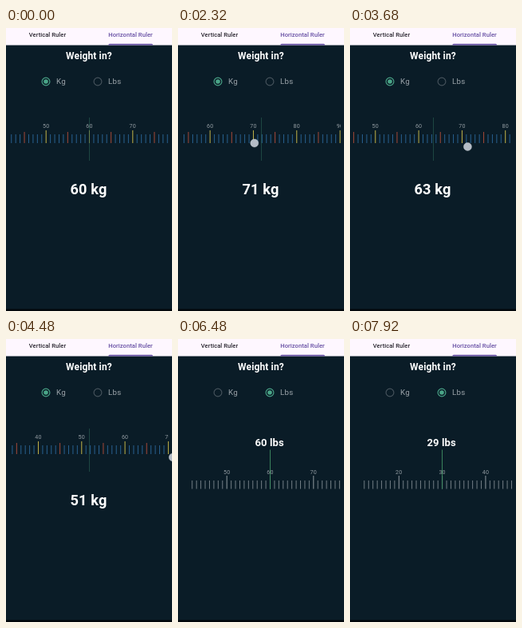
Write an HTML page that moves like this. It is 208 px wide and 354 px high and loops after 8 s.

```html
<!DOCTYPE html>
<html lang="en">
<head>
<meta charset="utf-8">
<title>Ruler picker</title>
<style>
  html, body { margin: 0; width: 100%; height: 100%; overflow: hidden; background: #0a1c27; }
  svg { display: block; width: 208px; height: 354px; font-family: Roboto, sans-serif; }
  text { text-anchor: middle; }
  .tab { font-size: 7.58px; font-weight: 500; letter-spacing: .05px; fill: #29262f; }
  .tab.on { fill: #6750a4; }
  .title { font-size: 12px; font-weight: 700; letter-spacing: .13px; fill: #fff; }
  .option { font-size: 9.75px; letter-spacing: .25px; fill: #9aa3a9; text-anchor: start; }
  .value { font-weight: 700; letter-spacing: .13px; fill: #fff; }
  .num { font-size: 7.1px; letter-spacing: .2px; fill: #929ba1; }
  .ring { fill: none; stroke-width: 1.15; }
</style>
</head>
<body>
<svg viewBox="0 0 208 354">
  <defs>
    <clipPath id="kgClip"><rect x="4" y="100" width="200" height="80"/></clipPath>
    <clipPath id="lbsClip"><rect x="15.5" y="150" width="188.5" height="50"/></clipPath>
  </defs>
  <rect width="208" height="354" fill="#0a1c27"/>
  <rect y="351.5" width="208" height="2.5" fill="#02070b"/>
  <rect width="208" height="21.5" fill="#fef7ff"/>
  <text class="tab" x="52" y="10.8">Vertical Ruler</text>
  <text class="tab on" x="156" y="10.8">Horizontal Ruler</text>
  <path d="M128.3 21.5v-.2q0-1.6 1.6-1.6h52.6q1.6 0 1.6 1.6v.2z" fill="#6750a4"/>
  <text class="title" x="104" y="39">Weight in?</text>

  <g id="kgRadio" transform="translate(50 67)"><circle class="ring" r="4.9"/><circle class="dot" fill="#4aa588"/></g>
  <text class="option" x="63" y="70.4">Kg</text>
  <g id="lbsRadio" transform="translate(115 67)"><circle class="ring" r="4.9"/><circle class="dot" fill="#4aa588"/></g>
  <text class="option" x="128" y="70.4">Lbs</text>

  <g id="kg">
    <g clip-path="url(#kgClip)"><g id="kgScale"></g></g>
    <path d="M104.5 112V166" stroke="#2a6356" stroke-width=".6"/>
    <text id="kgValue" class="value" x="103.5" y="207.6" font-size="18.2"></text>
  </g>
  <g id="lbs">
    <g clip-path="url(#lbsClip)"><g id="lbsScale"></g></g>
    <path d="M115.5 138.5V187.5" stroke="#3f8f62" stroke-width=".9"/>
    <text id="lbsValue" class="value" x="114.6" y="133.8" font-size="13"></text>
  </g>
  <circle id="touch" r="5" fill="#b4bcc6" stroke="#d3d8de" stroke-width=".4"/>
</svg>
<script>
const LOOP = 8000, UNIT = 5.43, SWITCH = 5200;
const $ = id => document.getElementById(id);
const clamp = (x, a = 0, b = 1) => Math.min(b, Math.max(a, x));

function add(parent, tag, attrs, text = '') {
  const el = document.createElementNS('http://www.w3.org/2000/svg', tag);
  for (const k in attrs) el.setAttribute(k, attrs[k]);
  el.textContent = text;
  parent.append(el);
}

// kinds: [ones, fives, tens], each with a top edge and a colour
function buildScale(scale, from, to, bottom, labelY, kinds) {
  for (let n = from; n <= to; n++) {
    const [top, stroke] = kinds[n % 10 === 0 ? 2 : n % 5 === 0 ? 1 : 0];
    const x = (n * UNIT).toFixed(2);
    add(scale, 'path', { d: `M${x} ${top}V${bottom}`, stroke, 'stroke-width': .9 });
    if (n % 10 === 0) add(scale, 'text', { class: 'num', x, y: labelY }, n);
  }
}
buildScale($('kgScale'), 25, 100, 144, 125,
  [[133, '#2c689b'], [130, '#b64f3b'], [128, '#d9c64c']]);
buildScale($('lbsScale'), 5, 90, 187.5, 168.6,
  [[177, '#7d888f'], [177, '#7d888f'], [171, '#a0a9ae']]);

// Smooth curve through [time, value] points, at rest at both ends
function curve(points) {
  const last = points.length - 1;
  const slope = i => i <= 0 || i >= last ? 0 :
    (points[i + 1][1] - points[i - 1][1]) / (points[i + 1][0] - points[i - 1][0]);
  return t => {
    if (t <= points[0][0]) return points[0][1];
    if (t >= points[last][0]) return points[last][1];
    const i = points.findIndex(p => p[0] > t) - 1;
    const [t0, a] = points[i], [t1, b] = points[i + 1];
    const d = t1 - t0, u = (t - t0) / d, w = 1 - u;
    return a * (1 + 2 * u) * w * w + b * u * u * (3 - 2 * u)
      + d * u * w * (slope(i) * w - slope(i + 1) * u);
  };
}
const kgAt = curve([[960, 60], [1360, 62.9], [2320, 71.84], [2780, 73.6],
  [3680, 63.4], [4480, 51.8], [4780, 51.02]]);
const lbsAt = curve([[6520, 60], [6900, 53], [7280, 43], [7600, 34.5], [7900, 29.98]]);
const touchY = curve([[960, 137], [1360, 139], [2320, 144], [3680, 148.5], [4480, 148]]);

function showRuler(id, value, center) {
  $(id + 'Scale').setAttribute('transform', `translate(${center - value * UNIT})`);
  $(id + 'Value').textContent = `${Math.floor(value)} ${id}`;
}

function showRadio(id, on) {
  const [ring, dot] = $(id).children;
  ring.setAttribute('stroke', on > .5 ? '#4aa588' : '#46535c');
  dot.setAttribute('r', 2.8 * on);
}

// The finger runs slightly ahead of the scale
function touchAt(t) {
  if (t >= 960 && t < 4720) return [488 - UNIT * kgAt(t + 50), touchY(t)];
  if (t >= 5040 && t < 5200) return [115, 67];
  if (t >= 6540 && t < 7900) return [213 - UNIT * (lbsAt(t + 40) - 30), 179];
  return null;
}

function draw(now) {
  const t = now % LOOP;
  const isLbs = t >= SWITCH, mix = clamp((t - SWITCH) / 200);
  $('kg').style.display = isLbs ? 'none' : '';
  $('lbs').style.display = isLbs ? '' : 'none';
  showRuler('kg', kgAt(t), 104.5);
  showRuler('lbs', lbsAt(t), 115.5);
  showRadio('kgRadio', 1 - mix);
  showRadio('lbsRadio', mix);
  const finger = touchAt(t), touch = $('touch');
  touch.style.display = finger ? '' : 'none';
  if (finger) touch.setAttribute('transform', `translate(${finger})`);
}

const start = performance.now();
function tick() {
  draw(performance.now() - start);
  requestAnimationFrame(tick);
}
tick();
</script>
</body>
</html>
```
